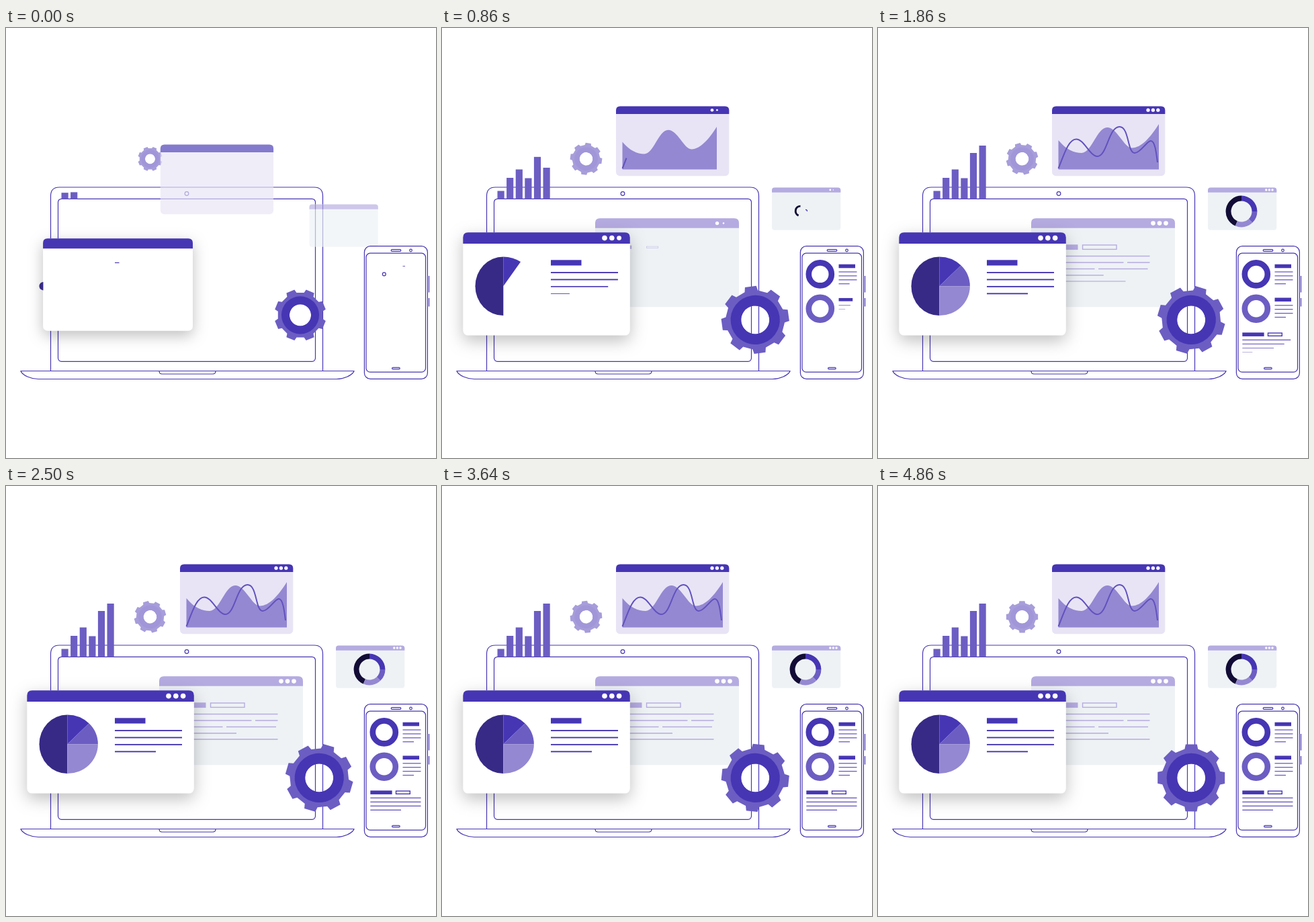
An HTML page for the animation above (4930 ms loop, 640 by 640 pixels).

```html
<!DOCTYPE html>
<html lang="en">
<head>
<meta charset="utf-8">
<title>Devices and charts</title>
<style>
html, body { margin: 0; width: 100%; height: 100%; overflow: hidden; background: #fff; }
svg { display: block; width: 100vw; height: 100vh; }
</style>
</head>
<body>
<svg id="stage" viewBox="0 0 640 640"></svg>
<script>
const NS = 'http://www.w3.org/2000/svg';
const LOOP = 4930, STEP = LOOP / 69, GROW = 540;
const INK = '#4636b4', MID = '#6c5dc3', SOFT = '#9488d2', PALE = '#b5abe1';
const DEEP = '#372a86', NIGHT = '#120c36', MIST = '#eef2f5';

const stage = document.getElementById('stage');
const updates = [];

const clamp = v => Math.max(0, Math.min(1, v));
const quad = p => 1 - (1 - p) ** 2;
const cubic = p => 1 - (1 - p) ** 3;
const mix = (a, b, k) => a + (b - a) * k;

function add(parent, tag, attrs) {
  const node = document.createElementNS(NS, tag);
  for (const key in attrs) node.setAttribute(key, attrs[key]);
  parent.appendChild(node);
  return node;
}
const group = () => add(stage, 'g', {});
const outline = width => ({ fill: 'none', stroke: INK, 'stroke-width': width });

// Scale a node up from the point (x, y)
function grow(node, x, y, start, vertical) {
  updates.push(t => {
    const s = quad(clamp((t - start) / GROW));
    node.setAttribute('transform',
      `translate(${x} ${y}) scale(${vertical ? 1 : s} ${s}) translate(${-x} ${-y})`);
  });
}

function block(x, y, w, h, fill, start) {
  grow(add(stage, 'rect', { x, y, width: w, height: h, fill }), x, y + h / 2, start);
}
function frame(x, y, w, h, stroke, start) {
  const node = add(stage, 'rect', { x, y, width: w, height: h, fill: 'none', stroke, 'stroke-width': 1.4 });
  grow(node, x, y + h / 2, start);
}
function rule(x, end, y, size, fill, start) {
  block(x, y - size / 2, end - x, size, fill, start);
}
function dots(parent, x, y, gap, r, start, lag) {
  for (let i = 0; i < 3; i++) {
    const cx = x + gap * i;
    grow(add(parent, 'circle', { cx, cy: y, r, fill: '#fff' }), cx, y, start + lag * i);
  }
}

// Pane with rounded corners and a coloured title bar
function pane(parent, x, y, w, h, bar, r, barFill, fill) {
  const body = add(parent, 'rect', { x, y, width: w, height: h, rx: r, fill });
  const head = add(parent, 'path', {
    d: `M${x} ${y + bar}V${y + r}Q${x} ${y} ${x + r} ${y}H${x + w - r}Q${x + w} ${y} ${x + w} ${y + r}V${y + bar}Z`,
    fill: barFill
  });
  return { body, head };
}

function slideIn(node, dx, dy) {
  updates.push(t => {
    const k = cubic(clamp(t / 600));
    node.setAttribute('transform', `translate(${dx * (1 - k)} ${dy * (1 - k)})`);
    node.setAttribute('opacity', mix(0.66, 1, k));
  });
}

const polar = (r, deg) => {
  const a = deg * Math.PI / 180;
  return `${(r * Math.sin(a)).toFixed(2)} ${(-r * Math.cos(a)).toFixed(2)}`;
};
const disc = r => `M0 ${-r}A${r} ${r} 0 1 0 0 ${r}A${r} ${r} 0 1 0 0 ${-r}Z`;

// Eight-toothed wheel, drawn around the origin
function gear(fill, ringFill) {
  const pts = [];
  for (let a = 0; a < 360; a += 45) {
    pts.push(polar(44, a - 13), polar(50.7, a - 9.6), polar(50.7, a + 9.6), polar(44, a + 13));
  }
  const node = group();
  add(node, 'path', { d: `M${pts.join('L')}Z${disc(21)}`, fill, 'fill-rule': 'evenodd' });
  add(node, 'circle', { r: 28.8, fill: 'none', stroke: ringFill, 'stroke-width': 15.6 });
  return node;
}
function turn(node, from, to, size, dir) {
  updates.push(t => {
    const k = cubic(clamp(t / 600));
    const x = mix(from[0], to[0], k), y = mix(from[1], to[1], k);
    const angle = dir * (22.5 + 0.0695 * t);
    node.setAttribute('transform',
      `translate(${x} ${y}) rotate(${angle}) scale(${size * mix(0.765, 1, k)})`);
  });
}

function wedge(cx, cy, r, a, b, inner) {
  const big = b - a > 180 ? 1 : 0;
  const back = inner ? `L${polar(inner, b)}A${inner} ${inner} 0 ${big} 0 ${polar(inner, a)}` : 'L0 0';
  return { d: `M${polar(r, a)}A${r} ${r} 0 ${big} 1 ${polar(r, b)}${back}Z`, transform: `translate(${cx} ${cy})` };
}

function laptop() {
  const line = outline(1.2);
  add(stage, 'path', { d: 'M66.5 510.5V250Q66.5 237 79.5 237H458.5Q471.5 237 471.5 250V510.5', ...line });
  add(stage, 'rect', { x: 77.5, y: 254.3, width: 383, height: 242, rx: 5, ...line });
  add(stage, 'circle', { cx: 269, cy: 246.5, r: 2.8, ...line });
  add(stage, 'path', { d: 'M22 510.5H518C516 517 502 522.5 492 522.5H48C38 522.5 24 517 22 510.5Z', ...line });
  add(stage, 'path', { d: 'M228 510.5Q228 515 232.5 515H307.5Q312 515 312 510.5', ...line });
}

function bars() {
  [12, 31.5, 44, 31, 68.5, 79.5].forEach((h, i) => {
    const node = add(stage, 'rect', { x: 82.5 + 13.6 * i, y: 254.5 - h, width: 10.2, height: h, fill: MID });
    grow(node, 0, 254.5, -285 + 190 * i, true);
  });
}

function areaPane() {
  const g = group();
  pane(g, 259, 116.5, 168.3, 103.7, 11.5, 6, INK, '#e8e4f5');
  dots(g, 402, 122.2, 7.4, 2.6, 500, 190);
  const area = add(g, 'path', {
    d: 'M268.5 167C280 181 292 186 303 186C318 186 326 148 341 148C356 148 366 178.5 378 178.5C392 178.5 406 162 418 143V210.5H268.5Z',
    fill: SOFT
  });
  grow(area, 268.5, 210.5, 450);
  const curve = add(g, 'path', {
    d: 'M268.5 209C276 191 283 165.5 295 165.5C307 165.5 315 191 326.5 191C341 191 343 147 359.5 147C374 147 371 186 382 186C391 186 400 168 406 168C412 168 414 184 416 200',
    fill: 'none', stroke: '#6151bf', 'stroke-width': 2, pathLength: 1
  });
  updates.push(t => {
    const k = quad(clamp((t - 830) / 870));
    curve.setAttribute('stroke-dasharray', `${k} 2`);
    curve.setAttribute('visibility', k > 0 ? 'visible' : 'hidden');
  });
  slideIn(g, -29.2, 57);
}

function donutPane() {
  const g = group();
  pane(g, 491, 237.5, 102.3, 63.3, 7.2, 4, PALE, MIST);
  dots(g, 577.8, 241, 4.6, 1.7, 540, 190);
  const part = (a, b, fill, x, y, start) => {
    const holder = add(g, 'g', {});
    add(holder, 'path', { ...wedge(541, 273, 23.4, a, b, 15.5), fill });
    grow(holder, x, y, start);
  };
  part(203, 360, NIGHT, 529, 272, 745);
  part(0, 90, INK, 541, 273, 820);
  part(90, 136, MID, 541, 273, 930);
  part(136, 203, SOFT, 541, 273, 1040);
  slideIn(g, -39.5, 25);
}

function textPane() {
  const { body, head } = pane(stage, 228, 283.3, 214, 132, 14.5, 7, PALE, MIST);
  grow(body, 335, 349.3, 268);
  grow(head, 335, 290.5, 268);
  dots(stage, 409.5, 290.6, 9.5, 3.3, 550, 190);
  block(252, 322.3, 45.5, 7.8, PALE, 630);
  frame(304.5, 323, 50.5, 6.4, PALE, 755);
  [[252, 404.5, 339.5], [252, 365.5, 349], [371, 404.5, 349], [252, 322.5, 358.5],
   [328, 402, 358.5], [252, 343, 368], [252, 404.5, 377]].forEach(([x, end, y], i) =>
    rule(x, end, y, 1.5, PALE, 920 + 110 * i));
}

function piePane() {
  const g = group();
  g.style.filter = 'drop-shadow(0 8px 12px rgba(0,0,0,.25))';
  pane(g, 31.3, 304.3, 248.5, 153.3, 16.7, 7.5, INK, '#fff');
  updates.push(t => {
    const k = cubic(clamp(t / 450)), s = mix(0.897, 1, k);
    g.setAttribute('transform',
      `translate(${mix(166.5, 155.5, k)} ${mix(382, 381, k)}) scale(${s}) translate(-155.5 -381)`);
  });
  dots(stage, 242, 312.6, 10.8, 3.8, 270, 110);

  const half = group();
  add(half, 'path', { ...wedge(91.5, 384.2, 43.8, 180, 360), transform: 'translate(91.3 384.2) scale(.955 1)', fill: DEEP });
  grow(half, 49.5, 384.2, -40);
  [[0, 45, INK, 600, 500], [45, 90, MID, 980, 450], [90, 180, SOFT, 1330, 470]].forEach(([a, b, fill, start, time]) => {
    const node = add(stage, 'path', { fill });
    updates.push(t => {
      const k = quad(clamp((t - start) / time));
      const shape = wedge(91.3, 384.2, 43.8, a, mix(a, b, k));
      node.setAttribute('d', k ? shape.d : '');
      node.setAttribute('transform', shape.transform + ' scale(1.04 1)');
    });
  });

  block(162, 345.3, 45.5, 8.2, INK, -40);
  [262, 262, 262, 223].forEach((end, i) => rule(162, end, 364 + 10.45 * i, 1.9, INK, 145 + 190 * i));
}

function phone() {
  const line = outline(1.2);
  add(stage, 'rect', { x: 533.4, y: 324.6, width: 94, height: 197.8, rx: 9, ...line });
  add(stage, 'rect', { x: 536, y: 335.2, width: 88.5, height: 177, rx: 6, ...line });
  add(stage, 'rect', { x: 573.2, y: 329.6, width: 14.6, height: 2.8, rx: 1.4, ...line });
  add(stage, 'circle', { cx: 602.5, cy: 331, r: 1.8, ...line });
  add(stage, 'rect', { x: 574.7, y: 505.3, width: 11.4, height: 2.4, rx: 1, ...line });
  add(stage, 'path', { d: 'M629.5 369V393.5M629.5 402V414.5', ...line });

  [[366.4, INK, -40, 351.7], [417.7, MID, 150, 401.5]].forEach(([y, stroke, start, top], n) => {
    const ring = add(stage, 'circle', { cx: 562.8, cy: y, r: 17, fill: 'none', stroke, 'stroke-width': 8.6 });
    grow(ring, 562.8, y, start);
    const begin = -40 + 570 * n;
    block(590.5, top, 24.5, 5.6, INK, begin);
    [617.5, 617.5, 617.5, 607].forEach((end, i) =>
      rule(590.5, end, top + 11.3 + 5.9 * i, 1.3, MID, begin + 110 * (i + 1)));
  });

  block(542.3, 453.3, 32.3, 5.6, INK, 1210);
  frame(580.5, 454, 20.8, 4.3, INK, 1320);
  [617.5, 617.5, 617.5, 588].forEach((end, i) =>
    rule(542.3, end, 464.3 + 6 * i, 1.4, MID, 1430 + 110 * i));
}

laptop();
bars();
turn(gear('#a79dda', '#a196d8'), [214.5, 194.8], [214.5, 194.8], 0.473, -1);
areaPane();
textPane();
piePane();
turn(gear(MID, INK), [438, 427.3], [466.2, 434.4], 1, 1);
donutPane();
phone();

function draw(ms) {
  // The motion runs at 14 pictures per second
  const t = Math.floor((ms % LOOP + 5) / STEP) % 69 * STEP;
  updates.forEach(update => update(t));
}

let origin = null;
function tick(now) {
  if (origin === null) origin = now;
  draw(Math.max(0, now - origin));
  requestAnimationFrame(tick);
}
draw(0);
requestAnimationFrame(tick);
</script>
</body>
</html>
```
